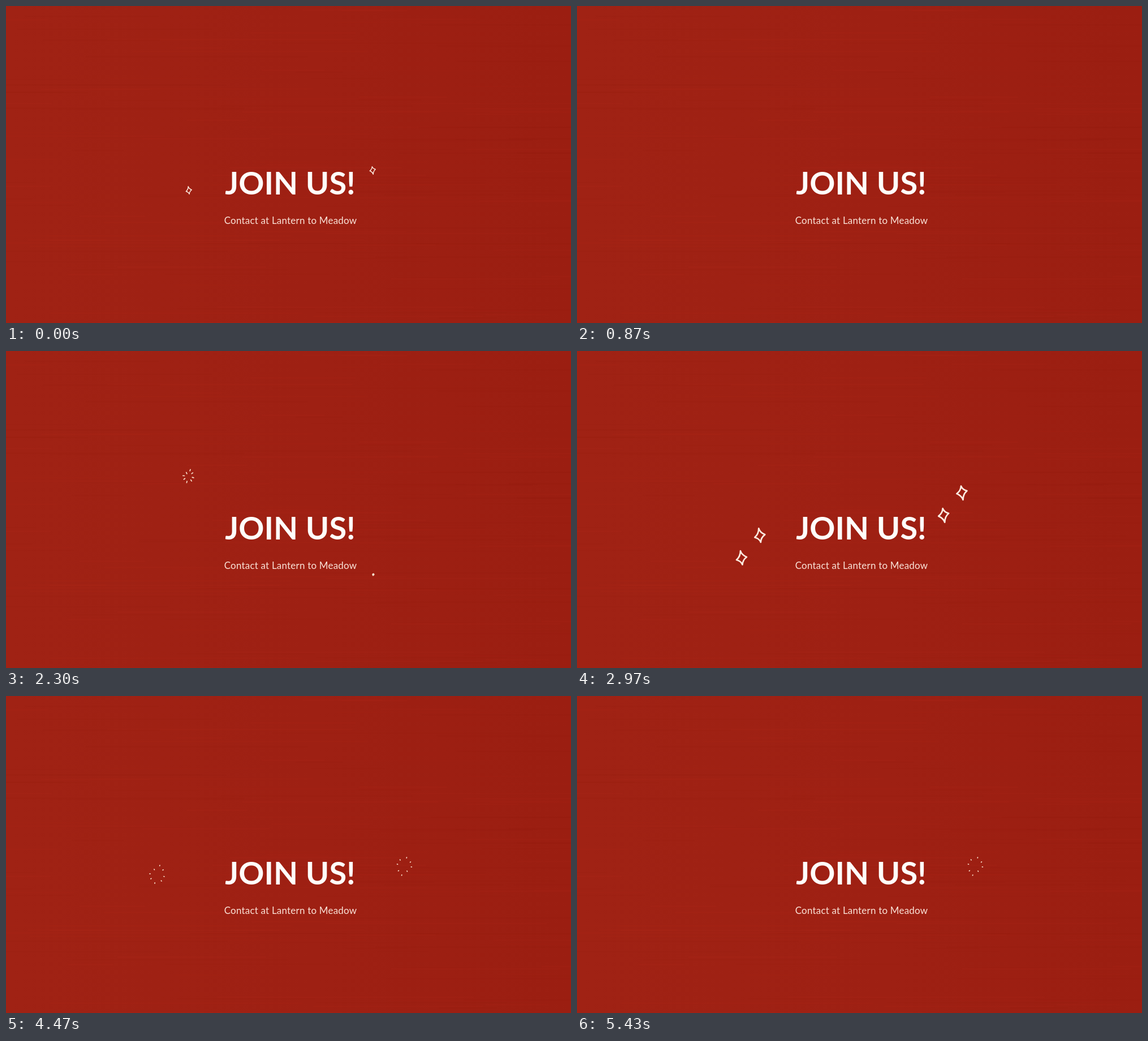
These frames come from a looping animation (999 px wide and 560 px high, 5.46 s). An HTML page:

```html
<!DOCTYPE html>
<html lang="en">
<head>
<meta charset="utf-8">
<title>Join us</title>
<style>
  html, body { margin: 0; width: 100%; height: 100%; overflow: hidden; background: #9e2013; }
  svg { display: block; width: 999px; height: 560px; }
  text { font-family: Lato, "Open Sans", sans-serif; text-anchor: middle; }
  .title { font-size: 56px; font-weight: 700; fill: #fffdfa; }
  .subtitle { font-size: 17px; letter-spacing: .2px; fill: #fae3d8; }
  .sparkle { fill: none; stroke: #fdebe0; stroke-width: 2.7; stroke-linejoin: round; }
  .dot { stroke: #fbe3cf; stroke-width: 1.7; stroke-linecap: round; }
</style>
</head>
<body>
<svg id="stage" viewBox="0 0 999 560">
  <defs>
    <linearGradient id="paint">
      <stop offset="0" stop-color="#a02214"/>
      <stop offset=".55" stop-color="#9e2013"/>
      <stop offset="1" stop-color="#9b1e11"/>
    </linearGradient>
  </defs>
  <rect width="999" height="560" fill="url(#paint)"/>
  <g id="streaks"></g>
  <g id="left"></g>
  <g id="right" transform="rotate(180 485.75 308)"></g>
  <text class="title" x="502.5" y="332.5">JOIN US!</text>
  <text class="subtitle" x="503" y="384.5">Contact at Lantern to Meadow</text>
</svg>
<script>
const LOOP = 5460, FRAME = 1000 / 30, CYCLE = 28;
const SPARKLE = "M-2-12Q0-5 9-1Q2 4 1.5 12.5Q-1 6-9 4Q-2-2-2-12Z";
const DOTS = [[5.5, -16], [-4.5, -9], [11.5, -8], [-12.5, -1],
              [13.5, 4], [-10.5, 8], [8.5, 12], [-3.5, 16]];
const SPARKLES = [
  { x: 323.3, y: 325.3, start: 0, end: 11 },
  { x: 291, y: 365, start: 2, end: 13 }
];
const BURSTS = [
  { x: 322, y: 221, start: 12 },
  { x: 266.5, y: 315, start: 17 }
];
const BURST_LIFE = 6;

const byId = id => document.getElementById(id);

function add(parent, tag, attributes) {
  const node = document.createElementNS("http://www.w3.org/2000/svg", tag);
  for (const key in attributes) node.setAttribute(key, attributes[key]);
  return parent.appendChild(node);
}

function paintStreaks() {
  let seed = 17;
  const random = () => (seed = seed * 16807 % 2147483647) / 2147483647;
  for (let i = 0; i < 150; i++) {
    const width = 80 + random() * 380;
    add(byId("streaks"), "rect", {
      x: random() * 1100 - 150, y: random() * 560,
      width, height: .7 + random() * 1.8, rx: 1,
      fill: random() < .5 ? "#b02a1a" : "#8c190e", opacity: .12
    });
  }
}

function buildSide(id, burstDelay) {
  const side = byId(id);
  const sparkles = SPARKLES.map(spec => ({
    ...spec, node: add(side, "path", { class: "sparkle", d: SPARKLE })
  }));
  const bursts = BURSTS.map(spec => {
    const node = add(side, "g", { transform: `translate(${spec.x} ${spec.y})` });
    const dots = DOTS.map(([x, y]) => ({ x, y, node: add(node, "line", { class: "dot" }) }));
    return { ...spec, start: spec.start + burstDelay, node, dots };
  });
  return { sparkles, bursts };
}

function show(node, visible) {
  node.setAttribute("visibility", visible ? "visible" : "hidden");
  return visible;
}

function drawSparkle({ x, y, start, end, node }, phase) {
  if (!show(node, phase >= start && phase < end)) return;
  const edge = Math.min(phase - start, end - 1 - phase);
  const scale = Math.min(1, .55 + .25 * edge);
  node.setAttribute("transform", `translate(${x} ${y}) scale(${scale})`);
}

function drawBurst({ start, node, dots }, phase) {
  const age = phase - start;
  if (!show(node, age >= 0 && age < BURST_LIFE)) return;
  const reach = 1 - .9 * Math.exp(-1.2 * age);
  const length = age < BURST_LIFE - 2 ? 2.6 : 1;
  for (const dot of dots) {
    const radius = Math.hypot(dot.x, dot.y);
    const inner = Math.max(0, reach - length / radius);
    dot.node.setAttribute("x1", dot.x * inner);
    dot.node.setAttribute("y1", dot.y * inner);
    dot.node.setAttribute("x2", dot.x * reach);
    dot.node.setAttribute("y2", dot.y * reach);
  }
}

paintStreaks();
const sides = [buildSide("left", 0), buildSide("right", 1)];

function render(time) {
  // Small offset absorbs the 10 ms rounding of the frame times.
  const phase = Math.floor((time % LOOP + 4) / FRAME) % CYCLE;
  for (const { sparkles, bursts } of sides) {
    sparkles.forEach(sparkle => drawSparkle(sparkle, phase));
    bursts.forEach(burst => drawBurst(burst, phase));
  }
}

let origin;
function tick(now) {
  origin ??= now;
  render(now - origin);
  requestAnimationFrame(tick);
}
render(0);
requestAnimationFrame(tick);
</script>
</body>
</html>
```
